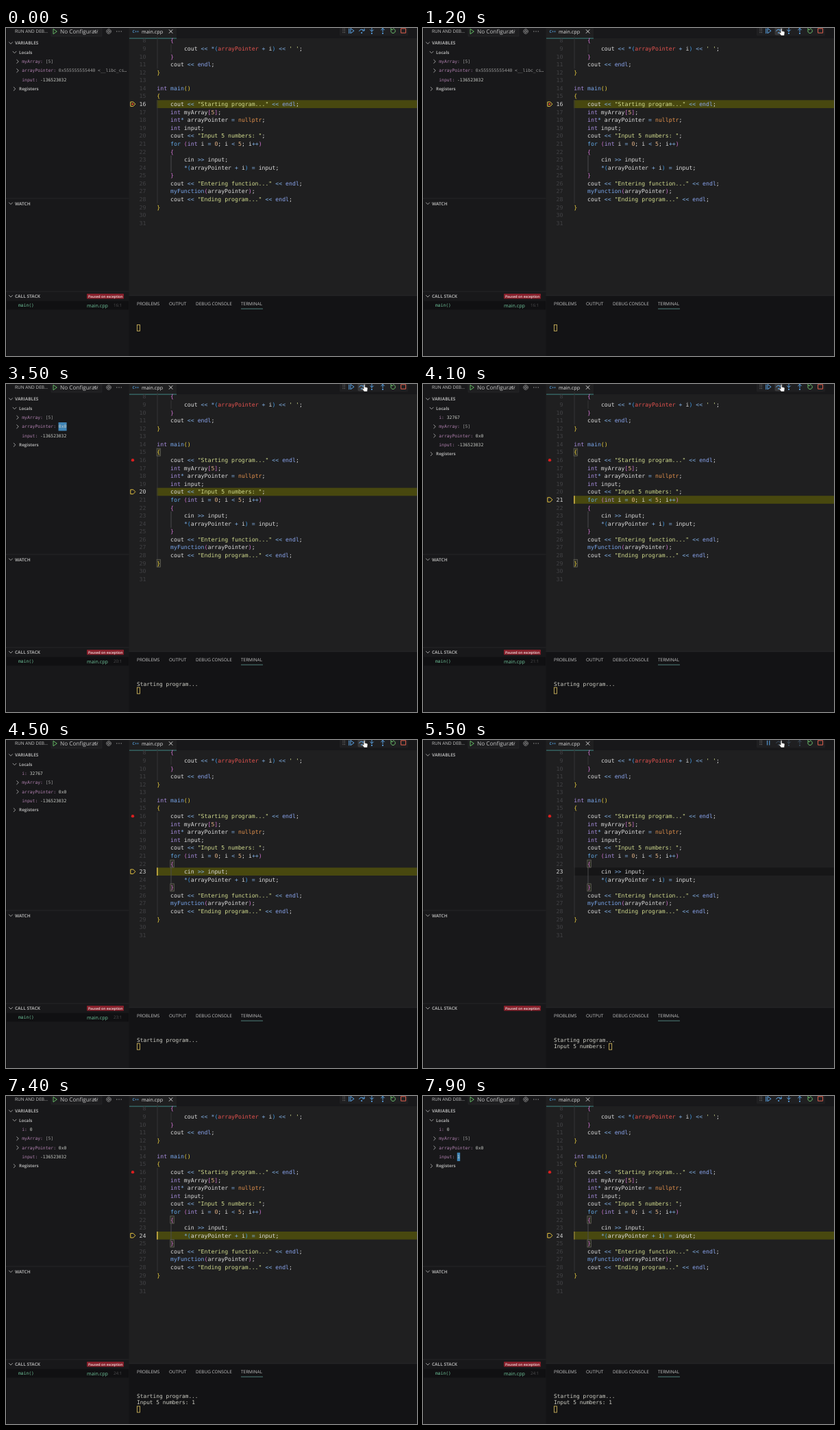
Write an HTML page that moves like this. It is 600 px wide and 479 px high and loops after 8000 ms.

```html
<!DOCTYPE html>
<html lang="en">
<head>
<meta charset="utf-8">
<title>Stepping through a debugger</title>
<style>
  html, body { margin: 0; width: 100%; height: 100%; overflow: hidden; background: #1f1f20; }
  svg { display: block; width: 100vw; height: 100vh; }
  text { white-space: pre; text-rendering: geometricPrecision; }
  .ui { font-family: "Open Sans", "Noto Sans", sans-serif; font-size: 6.45px; fill: #c4c4c4; }
  .bold { font-weight: 700; fill: #a9a9a9; }
  .tree { font-size: 6.25px; }
  .mono { font-family: "DejaVu Sans Mono", monospace; }
  .code { font-size: 8.217px; fill: #dcdcdc; }
  .var { font-size: 6.35px; fill: #c9ccc6; }
  .term { font-size: 7.84px; fill: #cfcfc6; }
  .line { fill: none; stroke-width: 1; stroke-linecap: round; stroke-linejoin: round; }
</style>
</head>
<body>
<svg id="stage" viewBox="0 0 600 479" preserveAspectRatio="none">
  <defs><clipPath id="configClip"><rect x="66" y="0" width="67.5" height="13"/></clipPath></defs>
</svg>
<script>
const LOOP = 8000, RUN = 5300, RESUME = 7400;
const STOPS = [[0, 16], [1600, 18], [2700, 20], [4000, 21], [4400, 23], [RESUME, 24]];
const FIRST_LINE = 8, CODE_X = 220.3, CHAR = 4.947, TERM_CHAR = 4.72;
const SOURCE = `    {
        cout << *(arrayPointer + i) << ' ';
    }
    cout << endl;
}

int main()
{
    cout << "Starting program..." << endl;
    int myArray[5];
    int* arrayPointer = nullptr;
    int input;
    cout << "Input 5 numbers: ";
    for (int i = 0; i < 5; i++)
    {
        cin >> input;
        *(arrayPointer + i) = input;
    }
    cout << "Entering function..." << endl;
    myFunction(arrayPointer);
    cout << "Ending program..." << endl;
}

`.split("\n");

const stage = document.getElementById("stage");
const timed = [];
const lineY = n => 18.5 + (n - FIRST_LINE) * 11.58;

function add(tag, attrs = {}, parent = stage, content = "") {
  const el = document.createElementNS("http://www.w3.org/2000/svg", tag);
  for (const key in attrs) el.setAttribute(key, attrs[key]);
  el.textContent = content;
  parent.append(el);
  return el;
}
const rect = (x, y, width, height, fill, parent, more) =>
  add("rect", { x, y, width, height, fill, ...more }, parent);
const line = (d, stroke, parent, more) =>
  add("path", { d, stroke, class: "line", ...more }, parent);
const label = (x, y, content, cls, parent, more) =>
  add("text", { x, y, class: cls, ...more }, parent, content);
const group = parent => add("g", {}, parent);
const during = (el, ...spans) => (timed.push({ el, spans }), el);
const chevron = (x, y, open, parent) =>
  line(open ? `M${x - 2.5} ${y - 1.3}l2.5 2.6 2.5-2.6` : `M${x - 1.3} ${y - 2.5}l2.6 2.5-2.6 2.5`,
    "#9a9a9a", parent, { "stroke-width": 0.8 });

// Panes
rect(180, 0, 420, 391, "#1f1f20");
rect(249, 0, 351, 15, "#18181a");
rect(180, 14.6, 69, 1, "#3f8582");
rect(0, 0, 179.5, 479, "#18181a");
rect(0, 0, 1, 479, "#0e0e0f");
rect(179.5, 391, 420.5, 88, "#131315");
rect(179.5, 390.5, 420.5, 0.7, "#2b2b2d");
for (const y of [248.5, 384.5]) rect(0, y, 179.5, 0.8, "#29292b");

// Sidebar header
label(13, 7.3, "RUN AND DEB…", "ui");
rect(66, -2, 74, 14, "#1e1e20", stage, { stroke: "#2b2b2d", "stroke-width": 0.6 });
line("M69 1.8v7l5-3.5z", "#62b562");
label(79, 7.8, "No Configuration", "ui", stage, { style: "font-size:8.2px", "clip-path": "url(#configClip)" });
chevron(131.5, 5.3, true);
add("circle", { cx: 150, cy: 5, r: 3.3, class: "line", stroke: "#8c8c8c", "stroke-dasharray": "1.7 .9" });
add("circle", { cx: 150, cy: 5, r: 1.5, class: "line", stroke: "#8c8c8c", "stroke-width": 0.8 });
for (const x of [161.8, 165, 168.2]) add("circle", { cx: x, cy: 5, r: 0.7, fill: "#999" });
for (const [y, name] of [[22, "VARIABLES"], [256.3, "WATCH"], [391.7, "CALL STACK"]]) {
  chevron(7, y, true);
  label(13, y + 2.4, name, "ui bold");
}
rect(118, 388, 54, 7.6, "#86202b", stage, { rx: 0.8 });
label(120, 393.6, "Paused on exception", "ui", stage, { style: "font-size:5.05px;font-weight:600;fill:#f0e4e4" });

// Variables
const paused = during(group(), [0, RUN], [RESUME, LOOP]);
const flashes = [];

function variable(parent, y, name, states, nested) {
  if (nested) chevron(17, y, false, parent);
  const x = 23.3 + (name.length + 2) * 3.823;
  label(23.3, y + 2.2, name + ":", "mono var", parent, { style: "fill:#b181b0" });
  for (const { text, span, flash, dim } of states) {
    const state = during(group(parent), span);
    if (flash) flashes.push({
      start: span[0],
      el: rect(x - 0.3, y - 6.2, text.length * 3.823 + 0.6, 12.4, "#3f84b5", state)
    });
    label(x, y + 2.2, text, "mono var", state, dim && { style: "fill:#9b9b9b" });
  }
}
chevron(12.5, 35.5, true, paused);
label(19, 37.8, "Locals", "ui bold tree", paused);
const counter = during(group(paused), [4000, RUN], [RESUME, LOOP]);
variable(counter, 48.9, "i", [
  { text: "32767", span: [4000, 4800] },
  { text: "0", span: [4800, LOOP], flash: true }
]);
const rows = group(paused);
variable(rows, 48.9, "myArray", [{ text: "[5]", span: [0, LOOP], dim: true }], true);
variable(rows, 62.2, "arrayPointer", [
  { text: "0x555555555440 <__libc_cs…", span: [0, 3100], dim: true },
  { text: "0x0", span: [3100, LOOP], flash: true }
], true);
variable(rows, 75.6, "input", [
  { text: "-136523032", span: [0, 7800] },
  { text: "1", span: [7800, LOOP], flash: true }
]);
chevron(12.5, 88.9, false, rows);
label(19, 91.2, "Registers", "ui bold tree", rows);

// Call stack
rect(1, 398.7, 178, 12.6, "#101012", paused);
label(18, 407.3, "main()", "mono var", paused, { style: "fill:#6fc39a" });
label(118, 407.6, "main.cpp", "ui", paused, { style: "font-size:7.17px;fill:#6fc39a" });
const frameLine = label(157, 407.2, "", "ui", paused, { style: "font-size:6.2px;fill:#4c4c4e" });

// Editor tab
label(184.5, 7.2, "C++", "ui bold", stage, { style: "font-size:5.4px;fill:#4f93c9" });
label(198, 7.6, "main.cpp", "ui", stage, { style: "font-size:7.2px;fill:#e2e2e2" });
line("M238.2 2.6l4.8 4.8m0-4.8l-4.8 4.8", "#d0d0d0");

// Editor
const current = rect(220, 0, 380, 11.6, "#48480f");
const guide = (x, from, to, stroke = "#343436") =>
  line(`M${x} ${lineY(from) - 5.8}V${lineY(to) + 5.8}`, stroke, stage, { "stroke-width": 0.7 });
guide(221, 8, 11);
guide(241, 9, 9);
guide(221, 16, 28);
guide(241, 23, 24, "#4b4b4d");

function matchBox(parent, column, n) {
  rect(CODE_X + column * CHAR - 0.2, lineY(n) - 5.5, CHAR + 0.4, 11, "#2d2d25", parent,
    { stroke: "#77776a", "stroke-width": 0.6 });
}
const outer = during(group(), [1600, 4400]);
const inner = during(group(), [4400, LOOP]);
for (const n of [15, 29]) matchBox(outer, 0, n);
for (const n of [22, 25]) matchBox(inner, 4, n);

const COLORS = {
  int: "#a98fe0", for: "#63a9e6", nullptr: "#e5924c", endl: "#8ba6f0",
  main: "#78a5ea", myFunction: "#78a5ea"
};
const BRACKETS = ["#ecd03f", "#cf72cf", "#3f9be8"];
let depth = 1;

function tokenColor(token, n) {
  if ("([{".includes(token)) return BRACKETS[depth++ % 3];
  if (")]}".includes(token)) return BRACKETS[--depth % 3];
  if (/^["']/.test(token)) return "#d2dc8e";
  if (/^\d/.test(token)) return "#e0b184";
  if (/^[<>*+=]/.test(token)) return "#82b1e6";
  if (n === 9 && token === "arrayPointer") return "#e6534f";
  return COLORS[token] || "#dcdcdc";
}
const numbers = {};
SOURCE.forEach((source, i) => {
  const n = FIRST_LINE + i, y = lineY(n) + 2.9;
  numbers[n] = label(204.5, y, n, "mono code", stage, { "text-anchor": "end" });
  const body = source.trimStart();
  const text = label(CODE_X + (source.length - body.length) * CHAR, y, "", "mono code");
  for (const token of body.match(/"[^"]*"|'[^']*'|\w+|<<|>>|\+\+|\s+|./g) || [])
    add("tspan", { fill: token.trim() ? tokenColor(token, n) : "none" }, text, token);
});
numbers[31] = numbers[31] || label(204.5, lineY(31) + 2.9, 31, "mono code", stage, { "text-anchor": "end" });

const caret = rect(220.2, 0, 1.4, 11.6, "#e8c84a");
const pointer = group(paused);
line("M182.2-3.2h3.6l3 3.2-3 3.2h-3.6z", "#e3c13f", pointer);
const dot = parent => add("circle", { cx: 185, cy: lineY(16), r: 2.2, fill: "#d81f1f" }, parent);
during(dot(), [1600, LOOP]);
during(add("circle", { cx: 184.8, cy: lineY(16), r: 1.4, fill: "#d8461f" }), [0, 1600]);

// Debug toolbar
rect(487, -3, 100, 14.5, "#1f1f21", stage, { rx: 1.5 });
during(rect(513.5, -1, 12, 11.5, "#38383a", stage, { rx: 2 }), [1200, 5500]);
for (let i = 0; i < 6; i++)
  rect(491.5 + (i % 2) * 2.4, 1 + (i >> 1) * 2.5, 1.1, 1.1, "#777");
const resume = during(group(), [0, RUN], [RESUME, LOOP]);
line("M500.8 1v6.8M503 1v6.8l4.8-3.4z", "#5ba4e6", resume);
const pause = during(group(), [RUN, RESUME]);
line("M502.6 1.2v6M505.8 1.2v6", "#5ba4e6", pause, { "stroke-width": 1.2 });
const steps = group();
for (const d of ["M515.6 4.4a4 3.4 0 0 1 7.2-.6m.4-2.6v2.8h-2.8",
  "M534 0v5m-2.4-2.2l2.4 2.4 2.4-2.4", "M550 5.4v-5m-2.4 2.4l2.4-2.4 2.4 2.4"])
  line(d, "currentColor", steps);
for (const [cx, cy] of [[519.2, 7], [534, 7.8], [550, 7.8]])
  add("circle", { cx, cy, r: 1.1, fill: "currentColor" }, steps);
line("M562.4 2.2a3.3 3.3 0 1 0 2.8-1.3M562-.2v2.6h2.6", "#6cbf6c");
line("M577 .8h6.6v6.4h-6.6z", "#e0604f");

// Terminal
for (const [x, name] of [[191, "PROBLEMS"], [238, "OUTPUT"], [277, "DEBUG CONSOLE"], [343, "TERMINAL"]])
  label(x, 405, name, "ui");
rect(343, 409.6, 32, 0.9, "#578c86");
const termY = row => 437.8 + row * 9.8;
const print = (row, column, content, start) =>
  during(label(191 + column * TERM_CHAR, termY(row) + 2.7, content, "mono term"), [start, LOOP]);
print(0, 0, "Starting program...", 1600);
print(1, 0, "Input 5 numbers:", RUN);
print(1, 17, "1", 6700);
for (const [from, to, row, column, filled] of [
  [0, 1600, 0, 0], [1600, RUN, 1, 0], [RUN, 6200, 1, 17],
  [6200, 6700, 1, 17, true], [6700, RESUME, 1, 18, true], [RESUME, LOOP, 2, 0]
]) during(rect(191.4 + column * TERM_CHAR, termY(row) - 4.4, 4, 9, filled ? "#dcc267" : "none", stage,
  { stroke: "#cdb45c", "stroke-width": 0.9 }), [from, to]);

// Mouse
const mouse = during(group(), [1000, 6200]);
const hand = add("path", {
  d: "M-.8 0q.9-1 1.8 0v3.4l3 .7q1.2.4 1 1.7l-.6 4.2h-4.6l-3-4q.2-1.2 1.4-.5l1 .8z",
  fill: "#fff", stroke: "#222", "stroke-width": 0.5
}, mouse);
const beam = line("M-1.6-4h3.2M0-4v8M-1.6 4h3.2", "#d8d8d8", mouse, { "stroke-width": 0.7 });

const clamp = v => Math.min(1, Math.max(0, v));
const ease = v => { v = clamp(v); return v * v * (3 - 2 * v); };
const show = (el, on) => { el.style.visibility = on ? "inherit" : "hidden"; };

function render(t) {
  for (const { el, spans } of timed) show(el, spans.some(([a, b]) => t >= a && t < b));

  const [since, active] = STOPS.filter(([start]) => start <= t).pop();
  const running = t >= RUN && t < RESUME;
  const y = lineY(active);
  current.setAttribute("y", y - 5.8);
  current.setAttribute("fill", running ? "#161617" : "#48480f");
  pointer.setAttribute("transform", `translate(0 ${y})`);
  for (const n in numbers) numbers[n].style.fill = +n === active ? "#d0d0d0" : "#414144";
  frameLine.textContent = active + ":1";
  caret.setAttribute("y", y - 5.8);
  caret.style.opacity = since && !running ? clamp((550 - (t - since)) / 100) : 0;

  rows.setAttribute("transform", `translate(0 ${t >= 4000 ? 13.3 : 0})`);
  for (const { start, el } of flashes) {
    const age = (t - start) / 1000;
    el.style.opacity = Math.min(clamp(age / 0.05), clamp((1 - age) / 0.2));
  }
  steps.style.color = running ? "#3b4c5c" : "#5ba4e6";

  const enter = ease((t - 950) / 250), leave = ease((t - 5500) / 600);
  const mx = 523 + 20 * (1 - enter) - 249 * leave;
  const my = 1 - 14 * (1 - enter) + 445 * leave;
  mouse.setAttribute("transform", `translate(${mx} ${my})`);
  show(hand, my <= 15 && t >= 1000 && t < 6200);
  show(beam, my > 15 && t < 6200);
}

function tick() {
  render(performance.now() % LOOP);
  requestAnimationFrame(tick);
}
tick();
</script>
</body>
</html>
```
